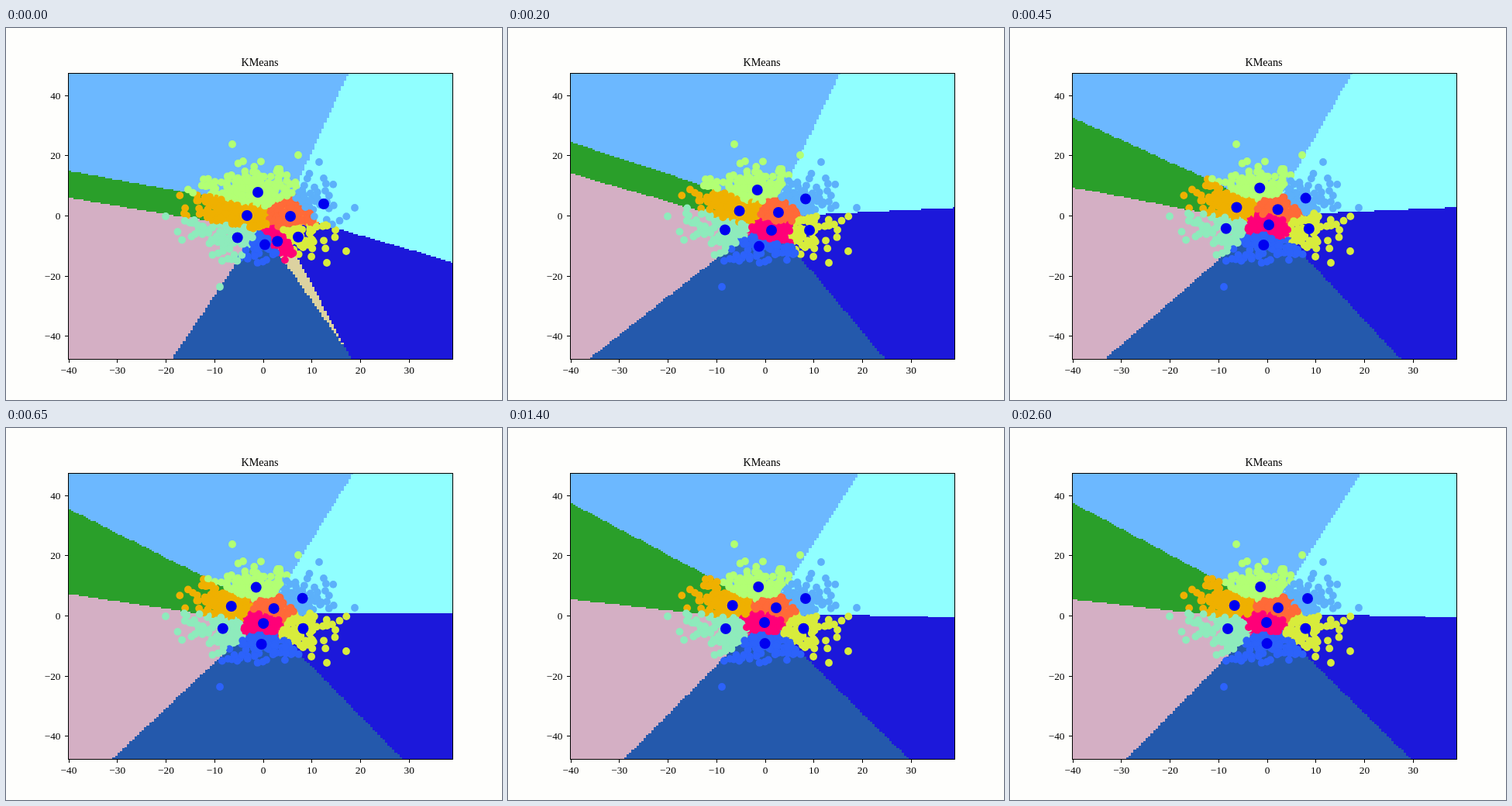
An HTML page with a canvas for the animation above (2650 ms loop, 640 by 480 pixels).

```html
<!DOCTYPE html>
<html lang="en">
<head>
<meta charset="utf-8">
<title>KMeans</title>
<style>
html, body { margin: 0; width: 100%; height: 100%; overflow: hidden; background: #fefefc; }
canvas { display: block; }
</style>
</head>
<body>
<canvas id="stage" width="640" height="480"></canvas>
<script>
const ctx = document.getElementById('stage').getContext('2d');
const STEP = 50, STEPS = 53, DECAY = 0.75;
const SX = 6.275, SY = 3.885;
const LEFT = 81, TOP = 58, RIGHT = 576, BOTTOM = 427;
const toX = v => 332 + v * SX;
const toY = v => 242.5 - v * SY;

// Each centre settles at (x, y), starting off by "from" and pushed by "drift"
const clusters = [
  { x: 323.2, y: 205, from: [1.8, 7], drift: [-1.6, 1.4], region: '#6cb8ff', point: '#b2ff74' },
  { x: 289.7, y: 229, from: [21.3, 13], drift: [1.7, 2.3], region: '#2a9f2a', point: '#efb000' },
  { x: 346, y: 232, from: [21, 11], drift: [-2.9, 2], region: '#ff9c40', point: '#ff6a38' },
  { x: 384, y: 220, from: [26, 7], drift: [-6.5, -1.35], region: '#90ffff', point: '#5cb0fa' },
  { x: 281, y: 259, from: [17.7, 11.5], drift: [-5.2, -1.7], region: '#d4afc4', point: '#8eebbc' },
  { x: 331.6, y: 278.1, from: [2.4, 1.5], drift: [-6.6, 2.6], region: '#2459ac', point: '#2c62fa' },
  { x: 331, y: 251, from: [19.3, 24.2], drift: [2.3, 1.85], region: '#dcd2a0', point: '#ff0078' },
  { x: 381.3, y: 258.8, from: [-4.3, 11], drift: [7.2, -1], region: '#1c18da', point: '#d8ec3c' }
];

const outliers = [[292, 150], [276, 334], [377, 164], [404, 173], [439, 288], [450, 232], [414, 303], [206, 243]];

let seed = 11;
function random() {
  seed = (seed * 16807) % 2147483647;
  return seed / 2147483647;
}

function makePoints(count) {
  const points = [...outliers];
  while (points.length < count) {
    const r = Math.sqrt(-2 * Math.log(random()));
    const a = random() * 2 * Math.PI;
    if (r < 2.8) points.push([327 + 42 * r * Math.cos(a), 240 + 26 * r * Math.sin(a)]);
  }
  return points;
}
const points = makePoints(900);

function centresAt(step) {
  const fade = DECAY ** step;
  return clusters.map(({ x, y, from, drift }) => [
    x + (from[0] + drift[0] * step) * fade,
    y + (from[1] + drift[1] * step) * fade
  ]);
}

// Nearest centre, measured in data units
function nearest(x, y, centres) {
  let best = 0, least = Infinity;
  centres.forEach(([cx, cy], i) => {
    const d = ((x - cx) / SX) ** 2 + ((y - cy) / SY) ** 2;
    if (d < least) { least = d; best = i; }
  });
  return best;
}

function dot(x, y, r, color) {
  ctx.fillStyle = color;
  ctx.beginPath();
  ctx.arc(x, y, r, 0, 2 * Math.PI);
  ctx.fill();
}

// Rows of half-unit cells, with equal neighbours merged into runs
function drawRegions(centres) {
  const w = SX / 2, h = SY / 2;
  for (let y = TOP; y < BOTTOM; y += h) {
    const y0 = Math.round(y), y1 = Math.min(BOTTOM, Math.round(y + h));
    let start = LEFT, label = nearest(LEFT + w / 2, y + h / 2, centres);
    for (let x = LEFT + w; ; x += w) {
      const here = x < RIGHT ? nearest(x + w / 2, y + h / 2, centres) : -1;
      if (here === label) continue;
      const end = Math.min(RIGHT, Math.round(x));
      ctx.fillStyle = clusters[label].region;
      ctx.fillRect(start, y0, end - start, y1 - y0);
      if (here < 0) break;
      start = end;
      label = here;
    }
  }
}

function drawAxes() {
  ctx.strokeStyle = ctx.fillStyle = '#000';
  ctx.lineWidth = 1;
  ctx.strokeRect(80.5, 58.5, 496, 369);
  ctx.font = '13.33px "Liberation Serif", serif';
  const label = v => String(v).replace('-', '\u2212');
  ctx.textAlign = 'center';
  for (let v = -40; v <= 30; v += 10) {
    ctx.fillRect(Math.floor(toX(v)), 428, 1, 4);
    ctx.fillText(label(v), toX(v), 446);
  }
  ctx.textAlign = 'right';
  for (let v = -40; v <= 40; v += 20) {
    ctx.fillRect(76, Math.floor(toY(v)), 4, 1);
    ctx.fillText(label(v), 70.5, toY(v) + 4.5);
  }
  ctx.textAlign = 'center';
  ctx.font = '14.2px "Liberation Serif", serif';
  ctx.fillText('KMeans', 327.5, 49);
}

function draw(step) {
  const centres = centresAt(step);
  ctx.fillStyle = '#fefefc';
  ctx.fillRect(0, 0, 640, 480);
  drawRegions(centres);
  for (const [x, y] of points) dot(x, y, 4.9, clusters[nearest(x, y, centres)].point);
  for (const [x, y] of centres) dot(x, y, 7, '#0000f0');
  drawAxes();
}

let shown = -1;
function tick() {
  const step = Math.floor(performance.now() / STEP) % STEPS;
  if (step !== shown) draw(shown = step);
  requestAnimationFrame(tick);
}
tick();
</script>
</body>
</html>
```
